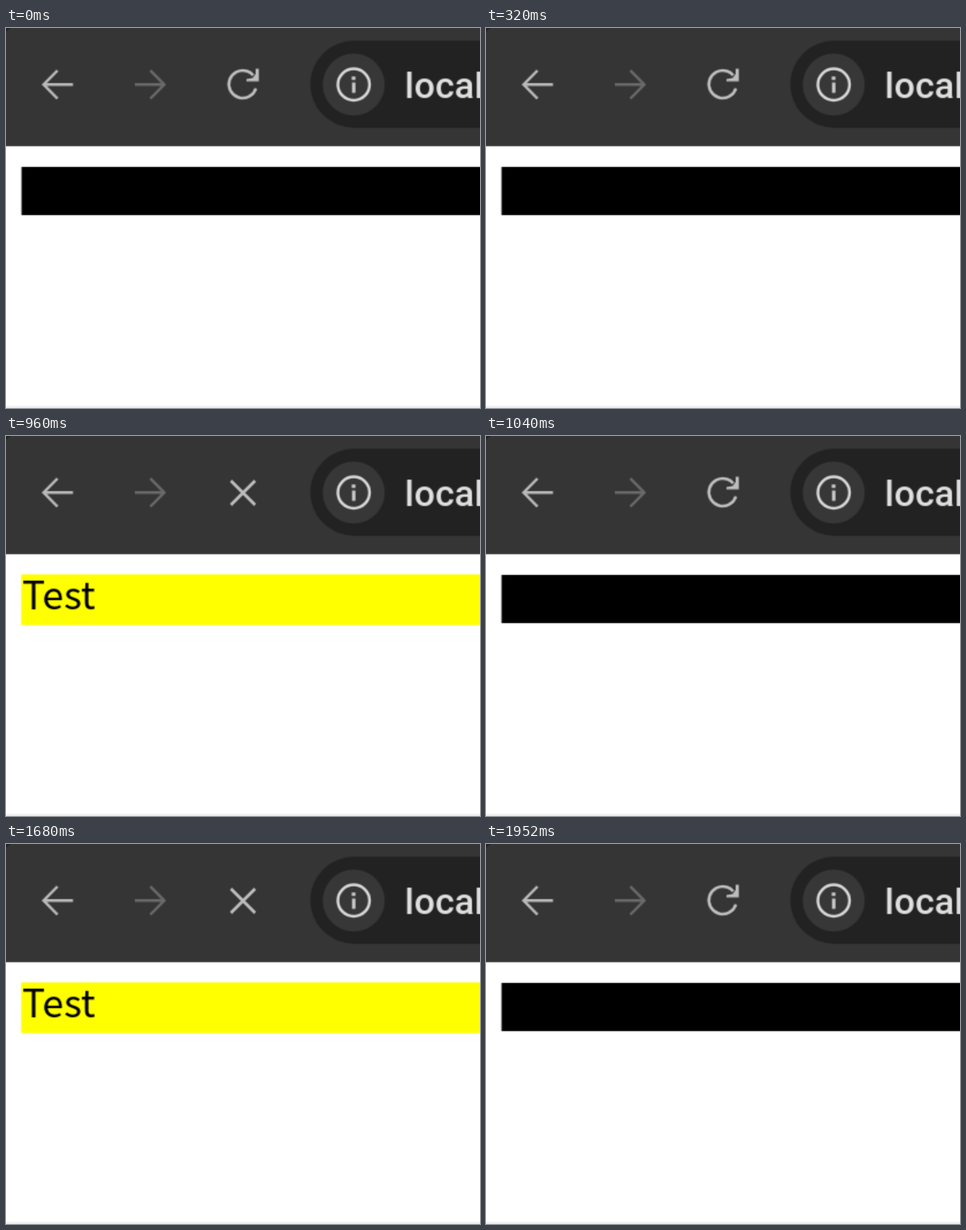
Recreate the animation shown at these times as an HTML page with a canvas. Size 824 by 662 pixels, loop 2080 ms.

```html
<!DOCTYPE html>
<html lang="en">
<head>
<meta charset="utf-8">
<title>Page reload flash</title>
<style>
html, body { margin: 0; width: 100%; height: 100%; overflow: hidden; background: #fff; }
canvas { display: block; }
</style>
</head>
<body>
<canvas id="stage" width="824" height="662"></canvas>
<script>
const screen2d = document.getElementById('stage').getContext('2d');
const LOOP = 2080, PERIOD = 720, FIRST = 240, FLASH = 80;
let ctx;

function rect(x, y, w, h, color) {
  ctx.fillStyle = color;
  ctx.fillRect(x, y, w, h);
}

function disc(x, y, r, color) {
  ctx.fillStyle = color;
  ctx.beginPath();
  ctx.arc(x, y, r, 0, Math.PI * 2);
  ctx.fill();
}

function stroke(color, width, ...lines) {
  ctx.strokeStyle = color;
  ctx.lineWidth = width;
  ctx.beginPath();
  for (const [start, ...rest] of lines) {
    ctx.moveTo(...start);
    rest.forEach(p => ctx.lineTo(...p));
  }
  ctx.stroke();
}

function label(text, x, y, font, color) {
  ctx.font = font;
  ctx.fillStyle = color;
  ctx.fillText(text, x, y);
}

// dir: -1 points left, 1 points right
function arrow(tip, dir, color) {
  const y = 98.5, back = tip - dir * 24;
  stroke(color, 5,
    [[tip - dir * 51, y], [tip - dir * 2, y]],
    [[back, y - 24.5], [tip, y], [back, y + 24.5]]);
}

function reloadIcon() {
  const color = '#bebebe';
  ctx.strokeStyle = color;
  ctx.lineWidth = 5;
  ctx.beginPath();
  ctx.arc(411.5, 98, 24, 0.3, Math.PI * 2 - 0.7);
  ctx.stroke();
  ctx.fillStyle = color;
  ctx.beginPath();
  ctx.moveTo(439.5, 71);
  ctx.lineTo(439.5, 93);
  ctx.lineTo(418, 93);
  ctx.lineTo(418, 89);
  ctx.lineTo(429, 87);
  ctx.lineTo(434, 80);
  ctx.lineTo(434, 71);
  ctx.fill();
}

function stopIcon() {
  stroke('#bebebe', 5, [[391, 78], [433, 120]], [[433, 78], [391, 120]]);
}

function toolbar(loading) {
  rect(0, 0, 824, 205.5, '#232323');
  ctx.fillStyle = '#353535';
  ctx.beginPath();
  ctx.roundRect(-3, -1, 900, 206.5, [18, 0, 0, 0]);
  ctx.fill();

  arrow(65.5, -1, '#b9b9b9');
  arrow(275, 1, '#696969');
  if (loading) stopIcon();
  else reloadIcon();

  ctx.fillStyle = '#222';
  ctx.beginPath();
  ctx.roundRect(529, 22, 500, 152, 76);
  ctx.fill();
  disc(604.5, 98.5, 54, '#373737');

  ctx.strokeStyle = '#d6d6d6';
  ctx.lineWidth = 5;
  ctx.beginPath();
  ctx.arc(604.5, 98.5, 27.5, 0, Math.PI * 2);
  ctx.stroke();
  rect(601, 84.5, 6.5, 6, '#c8c8c8');
  rect(601.5, 95, 6, 18, '#c8c8c8');
  label('local', 693, 121.5, '500 64px Roboto, sans-serif', '#dedede');
}

function page(loading) {
  rect(0, 0, 824, 662, '#fff');
  rect(0, 658.5, 824, 4, '#ededed');
  if (loading) {
    rect(26.5, 241, 800, 88.5, '#ff0');
    label('Test', 28, 301, '67px "Noto Sans CJK JP", "Noto Sans", sans-serif', '#000');
  } else {
    rect(27, 242, 800, 84, '#000');
  }
}

// Half-size views, enlarged when shown for the soft look of a zoomed screen
function view(loading) {
  const c = document.createElement('canvas');
  c.width = 412;
  c.height = 331;
  ctx = c.getContext('2d');
  ctx.scale(0.5, 0.5);
  page(loading);
  toolbar(loading);
  return c;
}

const idle = view(false), busy = view(true);
let shown = null;

function draw(now) {
  const t = now % LOOP;
  const next = t >= FIRST && (t - FIRST) % PERIOD < FLASH ? busy : idle;
  if (next !== shown) {
    screen2d.drawImage(next, 0, 0, 824, 662);
    shown = next;
  }
  requestAnimationFrame(draw);
}

draw(0);
</script>
</body>
</html>
```
